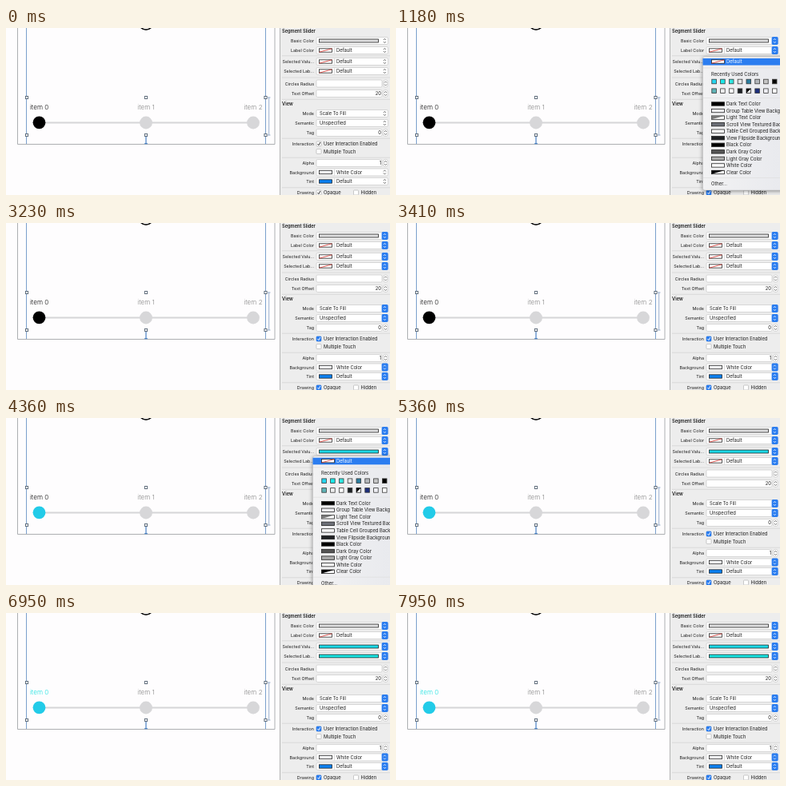
Write an HTML page that moves like this. It is 480 px wide and 209 px high and loops after 8 s.

```html
<!DOCTYPE html>
<html lang="en">
<head>
<meta charset="utf-8">
<title>Segment slider inspector</title>
<style>
  html, body { margin: 0; width: 100%; height: 100%; overflow: hidden; background: #fefdfe; }
  svg { display: block; width: 100vw; height: 100vh; }
  text { font: 5.8px Inter, Roboto, sans-serif; fill: #1c1c1c; }
  .head { font-size: 5.7px; font-weight: 600; }
  .label { font-size: 5.4px; text-anchor: end; }
  .item { font-size: 8.1px; font-weight: 300; fill: #888; text-anchor: middle; }
  .menu { filter: drop-shadow(0 1.5px 2.8px rgba(0, 0, 0, .42)); }
</style>
</head>
<body>
<svg id="stage" viewBox="0 0 480 209" preserveAspectRatio="none"></svg>
<script>
const LOOP = 8000;
const CYAN = '#22cbe8', AQUA = '#18e2e0', BLUE = '#2b7df0';

// Times in ms
const ACTIVE = 1000;
const FIRST = { open: 1000, leave: 1850, pick: 2050, close: 2700, apply: 3480 };
const SECOND = { open: 4200, leave: 4600, pick: 4750, close: 5080, apply: 5450 };

const rect = (x, y, w, h, fill, extra = '') =>
  `<rect x="${x}" y="${y}" width="${w}" height="${h}" fill="${fill}" ${extra}/>`;
const path = (d, stroke, width = 1, fill = 'none') =>
  `<path d="${d}" stroke="${stroke}" stroke-width="${width}" fill="${fill}"/>`;
const text = (x, y, s, extra = '') => `<text x="${x}" y="${y + 2.1}" ${extra}>${s}</text>`;
const circle = (x, y, r, fill, extra = '') =>
  `<circle cx="${x}" cy="${y}" r="${r}" fill="${fill}" ${extra}/>`;
// Group visible only between two times, with an optional fade at the end
const during = (from, to, body, fade = 0) =>
  `<g data-from="${from}" data-to="${to}" data-fade="${fade}">${body}</g>`;

const outline = (color, w = .8) => `stroke="${color}" stroke-width="${w}"`;
const boxed = (x, y, w, h, fill, border = '#222') => rect(x, y, w, h, fill, outline(border));
const field = (x, y, w, h = 9) =>
  rect(x, y - h / 2, w, h, '#fff', 'rx="1.6" ' + outline('#c2c2c2', .6));
const chevrons = (x, y, color) =>
  path(`M${x - 1.5} ${y - 1}l1.5 -1.6 1.5 1.6M${x - 1.5} ${y + 1}l1.5 1.6 1.5 -1.6`, color, .75);

function swatch(x, y, kind) {
  const w = 16, h = 4.4, top = y - h / 2;
  if (kind === 'none')
    return boxed(x, top, w, h, '#fff') + path(`M${x} ${top + h}L${x + w} ${top}`, '#d6332c', .8);
  if (kind === 'clear' || kind === 'light') {
    const dark = kind === 'clear' ? '#000' : '#777';
    return boxed(x, top, w, h, '#fff') +
      `<path d="M${x} ${top}h${w}L${x} ${top + h}z" fill="${dark}"/>`;
  }
  return boxed(x, top, w, h, kind);
}

function popup(y, body) {
  return field(388, y, 89.5) + body + chevrons(473.4, y, '#444') +
    during(ACTIVE, LOOP,
      rect(469.6, y - 4.9, 8, 9.8, BLUE, 'rx="1.6"') + chevrons(473.4, y, '#fff'));
}
const well = (y, color) => boxed(391.5, y - 2, 74, 4, color);
const colorBody = (y, kind, name) =>
  swatch(391.5, y, kind) + path(`M410.5 ${y - 4}v8`, '#ccc', .6) + text(413, y, name);
const label = (y, s) => text(385, y, s, 'class="label"');

function numberField(y, value) {
  return field(388, y, 82) + text(469, y, value, 'text-anchor="end"') +
    rect(472, y - 4.5, 5, 9, '#fff', 'rx="2" ' + outline('#c2c2c2', .6)) + chevrons(474.5, y, '#555');
}

function checkbox(x, y, name, checked) {
  const tick = color => path(`M${x + 1.4} ${y}l1.5 1.7 2 -3.7`, color, .9);
  return rect(x, y - 3, 6, 6, '#fff', 'rx="1" ' + outline('#aaa', .6)) +
    (checked ? tick('#222') +
      during(ACTIVE, LOOP, rect(x - .2, y - 3.2, 6.4, 6.4, BLUE, 'rx="1.2"') + tick('#fff')) : '') +
    text(x + 9, y, name);
}

function inspector() {
  const lines = [34.8, 62, 89.3, 138.2, 162.2, 199.8];
  // A colour row that turns from the default into a picked colour
  const changing = (y, color, at) => popup(y,
    during(0, at, colorBody(y, 'none', 'Default')) + during(at, LOOP, well(y, color)));
  return rect(342, 0, 138, 209, '#ededed') + path('M342.5 0V209', '#b4b4b4') +
    lines.map(y => path(`M345 ${y}H480`, '#d2d2d2', .7)).join('') +
    text(345, 4, 'Segment Slider', 'class="head"') +
    label(16, 'Basic Color') + popup(16, well(16, '#dededf')) +
    label(28, 'Label Color') + popup(28, colorBody(28, 'none', 'Default')) +
    label(42, 'Selected Valu...') + changing(42, '#1cd8e6', FIRST.apply) +
    label(54, 'Selected Lab...') + changing(54, AQUA, SECOND.apply) +
    label(69.5, 'Circles Radius') + numberField(69.5, '') +
    label(82, 'Text Offset') + numberField(82, '20') +
    text(345, 95, 'View', 'class="head"') +
    label(107, 'Mode') + popup(107, text(392, 107, 'Scale To Fill')) +
    label(119, 'Semantic') + popup(119, text(392, 119, 'Unspecified')) +
    label(131, 'Tag') + numberField(131, '0') +
    label(145, 'Interaction') + checkbox(388, 145, 'User Interaction Enabled', true) +
    checkbox(388, 154.5, 'Multiple Touch', false) +
    label(169, 'Alpha') + numberField(169, '1') +
    label(180.5, 'Background') + popup(180.5, colorBody(180.5, '#f6f8fa', 'White Color')) +
    label(192, 'Tint') + popup(192, colorBody(192, '#0b80f2', 'Default')) +
    label(206, 'Drawing') + checkbox(388, 206, 'Opaque', true) + checkbox(434.5, 206, 'Hidden', false);
}

const RECENT = [
  ['#25d4ee', '#1be8e8', '#30e6e0', '#e4e6e6', '#2a7d9f', '#b4b8bc', '#c6c6c6', '#000'],
  ['#5fb3b6', '#eee', '#fff', '#1c2023', 'split', '#1d2f7c', '#eeeef4', '#fff']
];
const COLORS = [
  ['Dark Text Color', '#000'], ['Group Table View Background Color', '#efeff4'],
  ['Light Text Color', 'light'], ['Scroll View Textured Background Color', '#6d7078'],
  ['Table Cell Grouped Background Color', '#fff'], ['View Flipside Background Color', '#1f2124'],
  ['Black Color', '#000'], ['Dark Gray Color', '#555'], ['Light Gray Color', '#aaa'],
  ['White Color', '#fff'], ['Clear Color', 'clear']
];

function menu(y, times, column) {
  const chipX = i => 394.8 + i * 10.8;
  const chips = RECENT.map((row, r) => row.map((color, i) => {
    const x = chipX(i), top = y + 22.2 + r * 11.7;
    return color === 'split'
      ? boxed(x, top, 5.6, 5.6, '#fff') + `<path d="M${x} ${top}h5.6l-5.6 5.6z" fill="#000"/>`
      : boxed(x, top, 5.6, 5.6, color, '#3a3a3a');
  }).join('')).join('');
  const rows = COLORS.map(([name, kind], i) => {
    const rowY = y + 53 + i * 8.55;
    return swatch(394.5, rowY, kind) + text(413, rowY, name);
  }).join('');
  const body = rect(383.5, y - 6, 130, 167, 'url(#menuFill)', 'rx="2.5" ' + outline('#bbb', .5)) +
    during(times.open, times.leave,
      rect(383.5, y - 4, 130, 8.6, BLUE) + text(413, y, 'Default', 'style="fill:#fff"')) +
    during(times.leave, times.close + 200, text(413, y, 'Default')) +
    swatch(394.5, y, 'none') +
    path(`M384 ${y + 8}H480M384 ${y + 45.5}H480M384 ${y + 145.5}H480`, '#dedede', .7) +
    text(394, y + 15.5, 'Recently Used Colors') + chips +
    during(times.pick, times.close + 200,
      rect(chipX(column) - 1, y + 21.2, 7.6, 7.6, 'none', 'rx="1" ' + outline('#2487f5', 1.5))) +
    rows + text(394, y + 153, 'Other...');
  return during(times.open, times.close, `<g class="menu">${body}</g>`, 150);
}

function canvas() {
  const handles = [26, 175, 324.5].flatMap(x => [87, 134].map(y =>
    rect(x - 1.6, y - 1.6, 3.2, 3.2, '#fff', outline('#51606f', .9)))).join('');
  const item = (x, name, color = '#888') =>
    text(x, 100.2, name, `class="item" style="fill:${color}"`);
  return path('M14.5 0V145.5H336V0', '#a4a6aa', .9) +
    path('M25.5 0V145M324.5 0V145', '#7ba0cc', 1) +
    circle(175, -6.5, 8.6, 'none', outline('#111', 1.6)) +
    path('M42 118.5H309', '#d6d6d8', 1.8) +
    circle(175, 118.5, 7.9, '#d7d7d9') + circle(309, 118.5, 7.9, '#d7d7d9') +
    during(0, FIRST.apply, circle(41.5, 118.3, 7.9, '#000')) +
    during(FIRST.apply, LOOP, circle(41.5, 118.3, 7.9, CYAN)) +
    during(0, SECOND.apply, item(41.6, 'item 0', '#111')) +
    during(SECOND.apply, LOOP, item(41.6, 'item 0', AQUA)) +
    item(175, 'item 1') + item(309, 'item 2') +
    path('M175 135V145M173.2 144.7H176.8', '#4a83c6', 1.2) +
    path('M328.7 87V134M327 87H330.5M327 134H330.5', '#7f9cc0', .8) + handles;
}

const menuFill = `<linearGradient id="menuFill" gradientUnits="userSpaceOnUse" x1="384" x2="480">
  <stop stop-color="#f2f2f3"/><stop offset="1" stop-color="#e9eaee"/></linearGradient>`;
const stage = document.getElementById('stage');
stage.innerHTML = menuFill + canvas() + inspector() + menu(42, FIRST, 0) + menu(53.7, SECOND, 1);

function schedule(el) {
  const from = el.dataset.from / LOOP, to = el.dataset.to / LOOP;
  const end = Math.min(1, to + el.dataset.fade / LOOP);
  const steps = [[0, 0], [from, 0], [from, 1], [to, 1], [end, 0], [1, 0]];
  const frames = steps
    .filter(([t, o]) => !(from === 0 && t === 0 && o === 0) && !(to === 1 && o === 0 && t === 1))
    .map(([offset, opacity]) => ({ offset, opacity }));
  el.animate(frames, { duration: LOOP, iterations: Infinity }).startTime = start;
}
const start = document.timeline.currentTime ?? 0;
stage.querySelectorAll('[data-from]').forEach(schedule);
</script>
</body>
</html>
```
